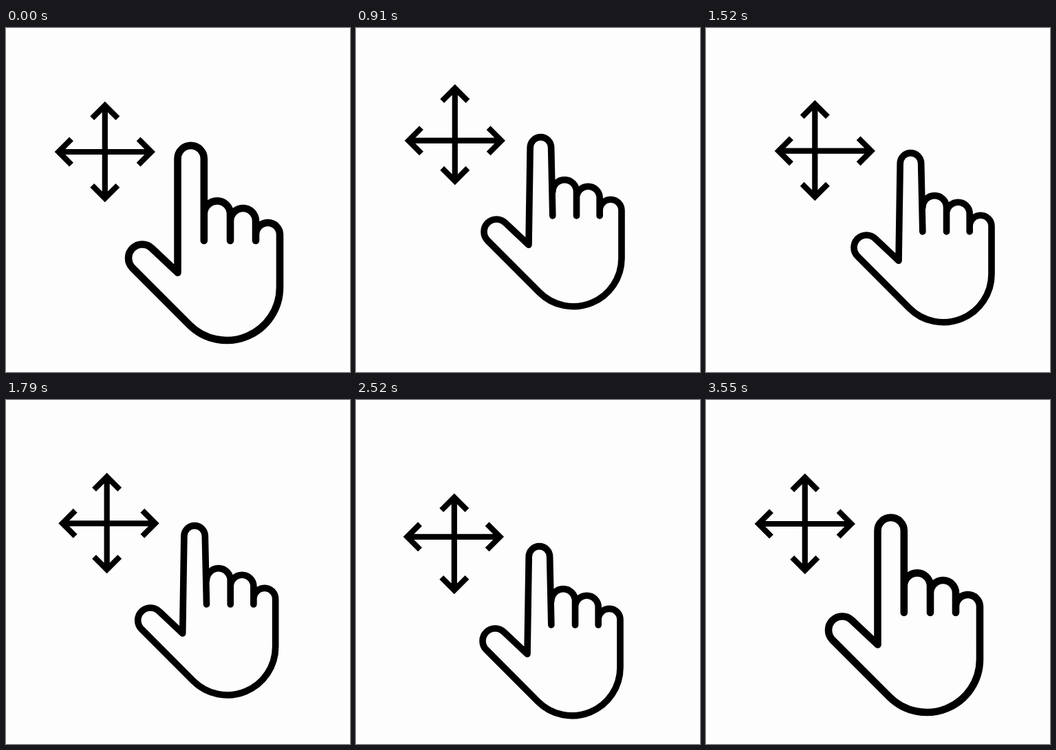
Animation, 500 px wide and 500 px high, one loop 3580 ms. Source, as an HTML page:

```html
<!DOCTYPE html>
<html lang="en">
<head>
<meta charset="utf-8">
<title>Drag gesture</title>
<style>
  html, body { margin: 0; width: 100%; height: 100%; overflow: hidden; background: #fdfdfd; }
  svg { display: block; width: 100%; height: 100%; }
  path { fill: none; stroke: #000; }
</style>
</head>
<body>
<svg viewBox="0 0 500 500">
  <defs>
    <path id="arrow" stroke-width="8.2" d="M-67.4 0H67.4M-48.8 -18.6L-67.4 0L-48.8 18.6M48.8 -18.6L67.4 0L48.8 18.6"/>
  </defs>
  <use id="across" href="#arrow"/>
  <use id="upright" href="#arrow"/>
  <path id="hand" stroke-width="10.6" stroke-linecap="round" stroke-linejoin="round"/>
</svg>
<script>
const LOOP = 3580, MOVE_START = 575, MOVE_TIME = 500;
const STOPS = [[0, 0], [0, -33.5], [30, -1], [-31, -1], [-1, 30], [0, 0]];
const CROSS = { x: 143.8, y: 180 };

const [across, upright, hand] = ['across', 'upright', 'hand'].map(id => document.getElementById(id));

const ease = p => {
  p = Math.min(1, Math.max(0, p));
  return p * p * (3 - 2 * p);
};
const arc = (r, x, y) => `A${r} ${r} 0 0 1 ${x} ${y}`;

// Pressing lowers and narrows the index fingertip.
function handPath(press) {
  const left = 249.5, right = 287.8, foot = 309, notch = `${left} 355.5`;
  const inset = 2.4 * press, tip = 190 + 10 * press;
  let d = `M${notch}L${left + inset} ${tip}`
    + arc((right - left) / 2 - inset, right - inset, tip) + `L${right} ${foot}`;

  let x = right;
  for (const [width, y] of [[38.2, 270.5], [37, 280.5], [35, 300.5]]) {
    d += `M${x} ${y}` + arc(width / 2, x += width, y) + `V${foot}`;
  }

  // Palm and thumb are circles cut along a 45 degree diagonal.
  const palm = 77, thumb = 20, k = Math.SQRT1_2;
  return d + `V377` + arc(palm, x - palm * (1 + k), 377 + palm * k)
    + `L${198 - thumb * k} ${334.5 + thumb * k}`
    + arc(thumb, 198 + thumb * k, 334.5 - thumb * k) + `L${notch}`;
}

function offset(t) {
  const progress = Math.min(STOPS.length - 1, Math.max(0, (t - MOVE_START) / MOVE_TIME));
  const leg = Math.min(STOPS.length - 2, Math.floor(progress));
  const p = ease(progress - leg);
  return STOPS[leg].map((from, axis) => from + (STOPS[leg + 1][axis] - from) * p);
}

function draw(t) {
  const press = ease(t / 380) - ease((t - 3280) / 270);
  const [dx, dy] = offset(t);

  // Each arrow follows fully along its own axis and lags sideways.
  across.setAttribute('transform', `translate(${CROSS.x + dx} ${CROSS.y + 0.65 * dy})`);
  upright.setAttribute('transform', `translate(${CROSS.x + 0.5 * dx} ${CROSS.y + dy}) rotate(90)`);
  hand.setAttribute('d', handPath(press));
  hand.setAttribute('transform',
    `translate(${266 + dx} ${188 + dy}) scale(${1 - 0.091 * press}) translate(-266 -188)`);
}

const start = performance.now();
function tick() {
  draw((performance.now() - start) % LOOP);
  requestAnimationFrame(tick);
}
tick();
</script>
</body>
</html>
```
